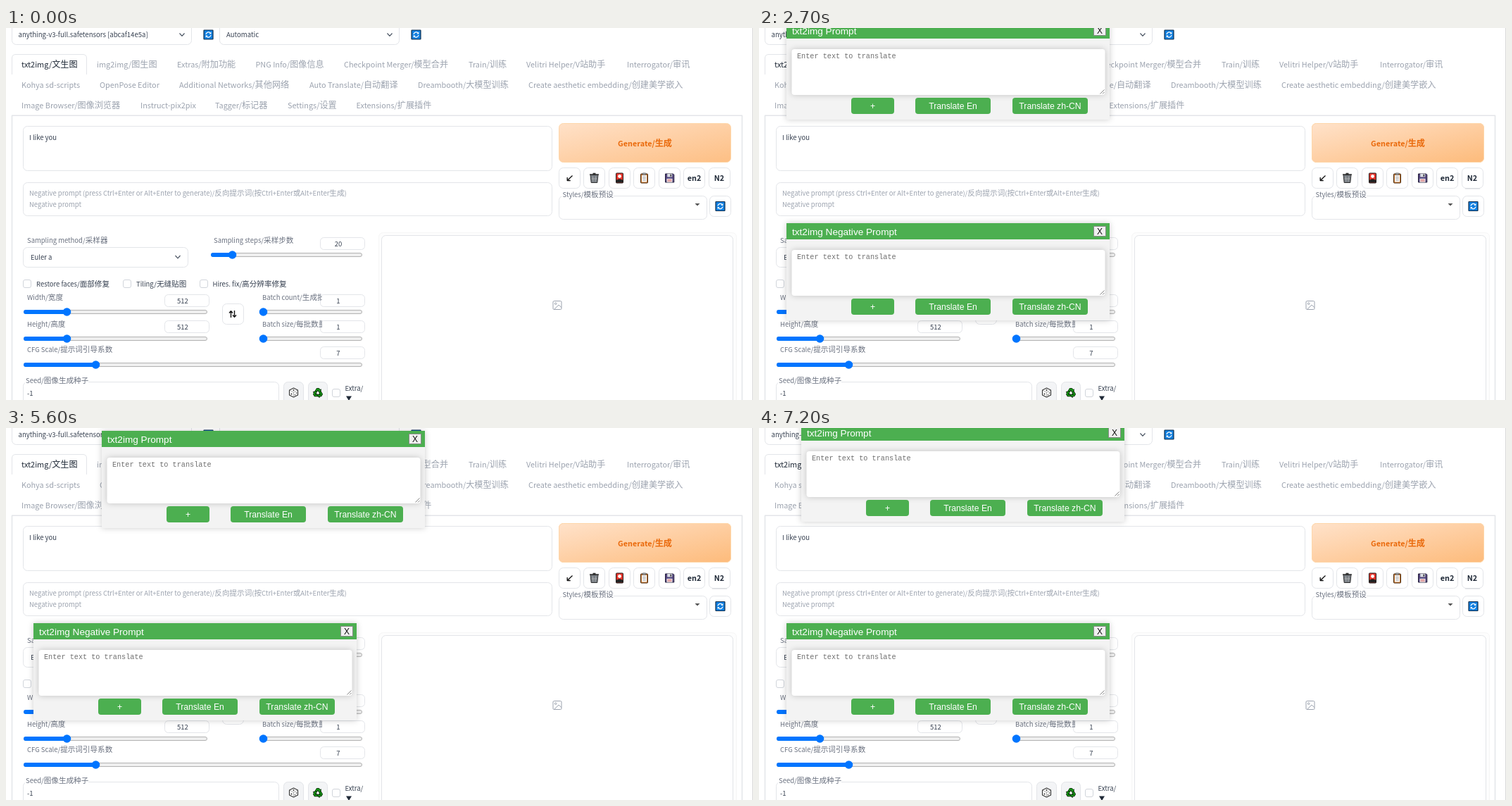
Animation of 1061 by 528 pixels, one loop 8000 ms. Source, as an HTML page:

```html
<!DOCTYPE html>
<html lang="en">
<head>
<meta charset="utf-8">
<title>Prompt translator</title>
<style>
  html, body { margin: 0; width: 100%; height: 100%; overflow: hidden; background: #fff; }
  svg { display: block; width: 1061px; height: 528px; }
  text { white-space: pre; }
  .ui { font-family: "Noto Sans CJK SC", "Noto Sans CJK JP", "Noto Sans CJK", "Noto Sans", sans-serif; }
  .dlg { font-family: "Liberation Sans", Arial, sans-serif; }
  .mono { font-family: "Liberation Mono", "Courier New", monospace; }
  .soft { filter: drop-shadow(0 0 4px rgba(0, 0, 0, .2)); }
</style>
</head>
<body>
<svg id="stage" viewBox="0 0 1061 528" xmlns="http://www.w3.org/2000/svg"></svg>
<script>
const LOOP = 8000;
const INK = '#1f2937', BODY = '#374151', GREY = '#9ca3af', LABEL = '#6b7280', LINE = '#e3e5e9', GREEN = '#4caf50';

const rect = (x, y, w, h, r = 0, fill = '#fff', stroke = 'none', more = '') =>
  `<rect x="${x}" y="${y}" width="${w}" height="${h}" rx="${r}" fill="${fill}" stroke="${stroke}" ${more}/>`;
const path = (d, stroke, width = 1, fill = 'none', more = '') =>
  `<path d="${d}" fill="${fill}" stroke="${stroke}" stroke-width="${width}" stroke-linejoin="round" ${more}/>`;
const circle = (x, y, r, fill) => `<circle cx="${x}" cy="${y}" r="${r}" fill="${fill}"/>`;
const at = (x, y, body) => `<g transform="translate(${x} ${y})">${body}</g>`;
const box = (x1, y1, x2, y2, r = 6, fill = '#fff') =>
  rect(x1 + .5, y1 + .5, x2 - x1 - 1, y2 - y1 - 1, r, fill, LINE);

// Latin glyphs of the CJK face are drawn large, so they get a smaller size.
function label(x, y, words, color = LABEL, size = 10.6, more = '') {
  const runs = words.match(/[\u2e80-\u9fff]+|[^\u2e80-\u9fff]+/g).map(run =>
    `<tspan font-size="${/[\u2e80-\u9fff]/.test(run) ? size : size * .895}">${run}</tspan>`);
  return `<text class="ui" x="${x}" y="${y + size * .34}" fill="${color}" ${more}>${runs.join('')}</text>`;
}
const plain = (cls, x, y, words, size, fill, anchor = 'start') =>
  `<text class="${cls}" x="${x}" y="${y}" font-size="${size}" fill="${fill}" text-anchor="${anchor}">${words}</text>`;

const chevron = (x, y) => path(`M${x - 3.5} ${y - 2}l3.5 3.8l3.5 -3.8`, '#4b5563', 1.2);
const check = (x, y) => rect(x + .5, y + .5, 11, 11, 2.5, '#fff', '#d1d5db');
const field = (x, y, value) =>
  box(x, y, x + 64, y + 18, 5) + label(x + 26, y + 9.5, value, BODY, 10.6, 'text-anchor="middle"');

function slider(x1, x2, y, thumb) {
  return rect(x1 + .5, y - 2.5, x2 - x1 - 1, 5, 2.5, '#efefef', '#b2b2b2') +
    rect(x1, y - 3, thumb - x1, 6, 3, '#0075ff') + circle(thumb, y, 5.8, '#0075ff');
}

const refresh = (x, y) => at(x, y,
  rect(-6.5, -6.5, 13, 13, .5, '#0f7fe0', '#10304f', 'stroke-width="1.2"') +
  path('M-3.5 -.5A3.6 3.6 0 0 1 2.6 -2.5M3.5 .5A3.6 3.6 0 0 1 -2.6 2.5', '#fff', 1.2) +
  path('M3.9 -4V-1H.9ZM-3.9 4V1H-.9Z', 'none', 0, '#fff'));

const icons = [
  path('M4 -3.5L-2.8 3M-3.3 -1V3.5H1.2', '#111', 1.3),
  path('M-5.5 -4.5H5.5L4.3 6.5H-4.3Z', '#333', 1, '#777d83') + path('M-6.5 -5H6.5M-2 -6.5H2', '#333', 1.4) +
    path('M-2 -2.5L-1.6 5M2 -2.5L1.6 5M-4 1H4', '#bbb', .7),
  rect(-5, -7, 10, 14, 1, '#e8352b', '#222') + circle(0, -2.5, 2.4, '#fff') +
    path('M-4.5 6.5V3Q0 -.5 4.5 3V6.5Z', 'none', 0, '#222'),
  rect(-5, -6, 10, 13, 1, '#c67a35', '#4a2c12') + rect(-3.5, -4, 7, 9.5, 0, '#fff') +
    path('M-2.3 -1.5H2.3M-2.3 .7H2.3M-2.3 3H2.3', '#888', .8) + rect(-2.5, -7, 5, 2.6, .8, '#aaa', '#444', 'stroke-width=".7"'),
  path('M-6 -6H5L6.3 -4.7V6H-6Z', '#25203a', 1, '#51447c') + rect(-3.3, -6, 7, 4.5, 0, '#d9dce2') +
    rect(1, -5.3, 1.6, 3, 0, '#333') + rect(-4, .8, 8, 5, 0, '#f4f4f4') + path('M-3 2.5H3M-3 4.2H3', '#d04c4c', .8)
];

const dice = path('M0 -6.5L6 -3.5V3.5L0 6.5L-6 3.5V-3.5Z', '#333', 1.1, '#fff') +
  path('M-6 -3.5L0 -.5L6 -3.5M0 -.5V6.5', '#8a8a8a', .7) +
  circle(0, -3.5, 1, '#333') + circle(-3, 2, 1, '#333') + circle(2, 3.2, .8, '#333') + circle(4, .5, .8, '#333');

const recycle = [0, 120, 240].map(a => `<g transform="rotate(${a} 0 1)">` +
  path('M-4 -1.5L-1.8 -5.5H1.8L3 -3.4L4.4 -4.2L3.8 .2L-.2 -1.6L1 -2.3L0 -3.6L-1.6 -.2Z', '#0a2a0a', .9, '#12a912') + '</g>').join('');

const tabRows = [
  [52, [[22, 'txt2img/文生图'], [129, 'img2img/图生图'], [243, 'Extras/附加功能'], [354.5, 'PNG Info/图像信息'],
    [480, 'Checkpoint Merger/模型合并'], [657, 'Train/训练'], [739, 'Velitri Helper/V站助手'], [882, 'Interrogator/审讯']]],
  [81, [[22, 'Kohya sd-scripts'], [133, 'OpenPose Editor'], [246, 'Additional Networks/其他网络'],
    [431, 'Auto Translate/自动翻译'], [585, 'Dreambooth/大模型训练'], [742, 'Create aesthetic embedding/创建美学嵌入']]],
  [110, [[22, 'Image Browser/图像浏览器'], [191, 'Instruct-pix2pix'], [297, 'Tagger/标记器'],
    [400, 'Settings/设置'], [497.5, 'Extensions/扩展插件']]]
];

function header() {
  const tabs = tabRows.map(([y, row]) => row.map(([x, words]) =>
    label(x, y, words, x === 22 && y === 52 ? INK : GREY, 12.15)).join('')).join('');
  return box(8, -12, 264, 24) + box(303, -12, 559, 24) +
    label(17.5, 9.5, 'anything-v3-full.safetensors [abcaf14e5a]', BODY, 10.7) +
    label(313, 9.5, 'Automatic', BODY, 10.7) +
    chevron(250, 9.5) + chevron(545, 9.5) + refresh(287.5, 9.5) + refresh(582.5, 9.5) +
    path('M8.5 66V43Q8.5 37.5 14 37.5H109Q114.5 37.5 114.5 43V66', LINE) + tabs +
    path('M8.5 528V124.2H1045.5V528', LINE, 1.5) + path('M1060.5 0V528', '#d8d8d8');
}

function promptArea() {
  const slots = [785, 820, 856, 891, 927, 962, 998];
  const centers = slots.map(x => x + 15.5);
  return box(24, 139, 776, 203) + label(33, 155, 'I like you', BODY) +
    box(24, 219, 776, 267) +
    label(33, 234.5, 'Negative prompt (press Ctrl+Enter or Alt+Enter to generate)/反向提示词(按Ctrl+Enter或Alt+Enter生成)', GREY) +
    label(33, 250, 'Negative prompt', GREY) +
    rect(785.5, 135.5, 244, 55, 6, 'url(#warm)', '#fed7aa') +
    rect(785.5, 135.5, 244, 55, 6, 'url(#pale)', '#fed7aa', 'id="glow"') +
    label(907.5, 163.5, 'Generate/生成', '#ea6a0c', 12.1, 'text-anchor="middle" font-weight="600"') +
    slots.map(x => box(x, 198, x + 31, 228)).join('') +
    path('M967 228H988', '#cfd2d7', 1, 'none', 'id="hoverEn"') +
    path('M1003 228H1024', '#cfd2d7', 1, 'none', 'id="hoverNeg"') +
    icons.map((icon, i) => at(centers[i], 213, icon)).join('') +
    label(977.5, 213, 'en2', INK, 12.1, 'text-anchor="middle" font-weight="600"') +
    label(1013, 213, 'N2', INK, 12.1, 'text-anchor="middle" font-weight="600"') +
    box(785, 238, 996, 272) + rect(789, 236, 74, 6) + label(790.5, 236.5, 'Styles/模板预设') +
    path('M978.5 249H985.5L982 252.5Z', 'none', 0, '#555') +
    box(999, 238, 1030, 268) + refresh(1014.5, 253);
}

function settings() {
  const batch = label(364, 382.5, 'Batch count/生成批次') + label(364, 420, 'Batch size/每批数量');
  return label(30, 301, 'Sampling method/采样器') + box(24, 311, 259, 340) +
    label(35, 325.5, 'Euler a', BODY) + chevron(244, 325) +
    label(295, 301, 'Sampling steps/采样步数') + field(446, 297, '20') + slider(291, 506, 322, 321.5) +
    check(24, 357) + label(43, 363, 'Restore faces/面部修复', BODY) +
    check(166, 357) + label(185, 363, 'Tiling/无缝贴图', BODY) +
    check(275, 357) + label(293.5, 363, 'Hires. fix/高分辨率修复', BODY) +
    label(30, 382.5, 'Width/宽度') + field(225, 378, '512') + slider(25, 286, 403, 86.5) +
    label(30, 420, 'Height/高度') + field(225, 415, '512') + slider(25, 286, 441, 86.5) +
    box(307, 391, 338, 421) +
    path('M319.5 411V402M317 404.5L319.5 401.8L322 404.5M324.5 401V410M322 407.5L324.5 410.2L327 407.5', '#111', 1.4) +
    field(446, 378, '1') + field(446, 415, '1') + `<g clip-path="url(#narrow)">${batch}</g>` +
    slider(360, 506, 403, 365.5) + slider(360, 506, 441, 365.5) +
    label(30, 456.5, 'CFG Scale/提示词引导系数') + field(446, 452, '7') + slider(25, 506, 478, 127.5) +
    box(24, 502, 388, 540) + rect(27, 500, 90, 6) + label(28, 500.5, 'Seed/图像生成种子') +
    label(30, 518.5, '-1', BODY) +
    box(394, 502, 423, 540, 6, '#f3f4f6') + box(429, 502, 457, 540, 6, '#f3f4f6') +
    at(408.5, 517.5, dice) + at(443, 517, recycle) +
    check(463, 512) + label(481.5, 511, 'Extra/', BODY) + path('M483 522.5H491L487 529Z', 'none', 0, INK);
}

function output() {
  return rect(529.5, 290.5, 508, 260, 6, '#fdfdfd', '#f6f6f6') + box(533, 294, 1033, 545) +
    at(783, 393.5, rect(-6, -6, 12, 12, 1.5, 'none', GREY) +
      `<circle cx="-2.3" cy="-2.3" r="1.3" fill="none" stroke="${GREY}"/>` +
      path('M-4.5 6L2 -.5L6 3.2', GREY));
}

function dialog(id, title) {
  const buttons = [[131, 61, '+'], [222, 107, 'Translate En'], [360, 107, 'Translate zh-CN']];
  return `<g id="${id}">` +
    rect(39, 277, 459, 138, 0, '#f3f3f3', 'none', 'class="soft"') +
    rect(39, 277, 459, 23, 0, GREEN) +
    plain('dlg', 47, 294, title, 13.6, '#fff') +
    rect(475.5, 281.5, 17, 14, 0, '#f0f0f0', '#8a8a8a') +
    plain('dlg', 484, 293, 'X', 12, '#111', 'middle') +
    rect(46.5, 315, 445, 65, 4, '#fff', 'none', 'class="soft"') +
    plain('mono', 54, 328.3, 'Enter text to translate', 10.2, '#707070') +
    path('M484.5 378.5L490.5 372.5M488 378.5L490.5 376', '#777', .9) +
    buttons.map(([x, w, words]) => rect(x, 384, w, 23, 4, GREEN) +
      plain('dlg', x + w / 2, 399.5, words, 12.2, '#fff', 'middle')).join('') + '</g>';
}

const gradient = (id, a, b) =>
  `<linearGradient id="${id}" x1="0" y1="0" x2="1" y2="1"><stop stop-color="${a}"/><stop offset="1" stop-color="${b}"/></linearGradient>`;

document.getElementById('stage').innerHTML =
  `<defs>${gradient('warm', '#ffe1c8', '#fdbf84')}${gradient('pale', '#ffe2ca', '#fdbb7b')}
   <clipPath id="narrow"><rect x="360" y="370" width="89" height="60"/></clipPath></defs>` +
  rect(0, 0, 1061, 528) + header() + promptArea() + settings() + output() +
  dialog('negative', 'txt2img Negative Prompt') + dialog('positive', 'txt2img Prompt');

const el = id => document.getElementById(id);
const glow = el('glow'), hoverEn = el('hoverEn'), hoverNeg = el('hoverNeg');
const positive = el('positive'), negative = el('negative');

// Drag path of the upper dialog: time, x, y
const drag = [
  [4000, 0, -285], [4300, 13, -280], [4600, 13, -280], [4700, 7, -275], [4800, -12, -275],
  [5000, -36, -275], [5200, -36, -275], [5800, 163, -272], [6100, 163, -272], [6200, 149, -272],
  [6300, 78, -272], [6400, 78, -272], [6700, -21, -271], [7200, 21, -282]
];

function dragAt(t) {
  const next = drag.findIndex(k => k[0] > t);
  if (next === 0) return drag[0].slice(1);
  if (next < 0) return drag[drag.length - 1].slice(1);
  const a = drag[next - 1], b = drag[next], f = (t - a[0]) / (b[0] - a[0]);
  return [1, 2].map(i => Math.round(a[i] + (b[i] - a[i]) * f));
}

const show = (node, on) => node.setAttribute('visibility', on ? 'visible' : 'hidden');

function draw(ms) {
  const t = Math.floor((ms % LOOP) / 100) * 100;
  glow.setAttribute('opacity', Math.min(1, Math.max(0, (t - 400) / 300)));
  show(hoverEn, t >= 1200 && t < 1700);
  show(hoverNeg, t >= 2500);
  show(positive, t >= 1700);
  show(negative, t >= 2700);
  positive.setAttribute('transform', `translate(${dragAt(t).join(' ')})`);
}

const start = performance.now();
function tick() {
  draw(performance.now() - start);
  requestAnimationFrame(tick);
}
tick();
</script>
</body>
</html>
```
